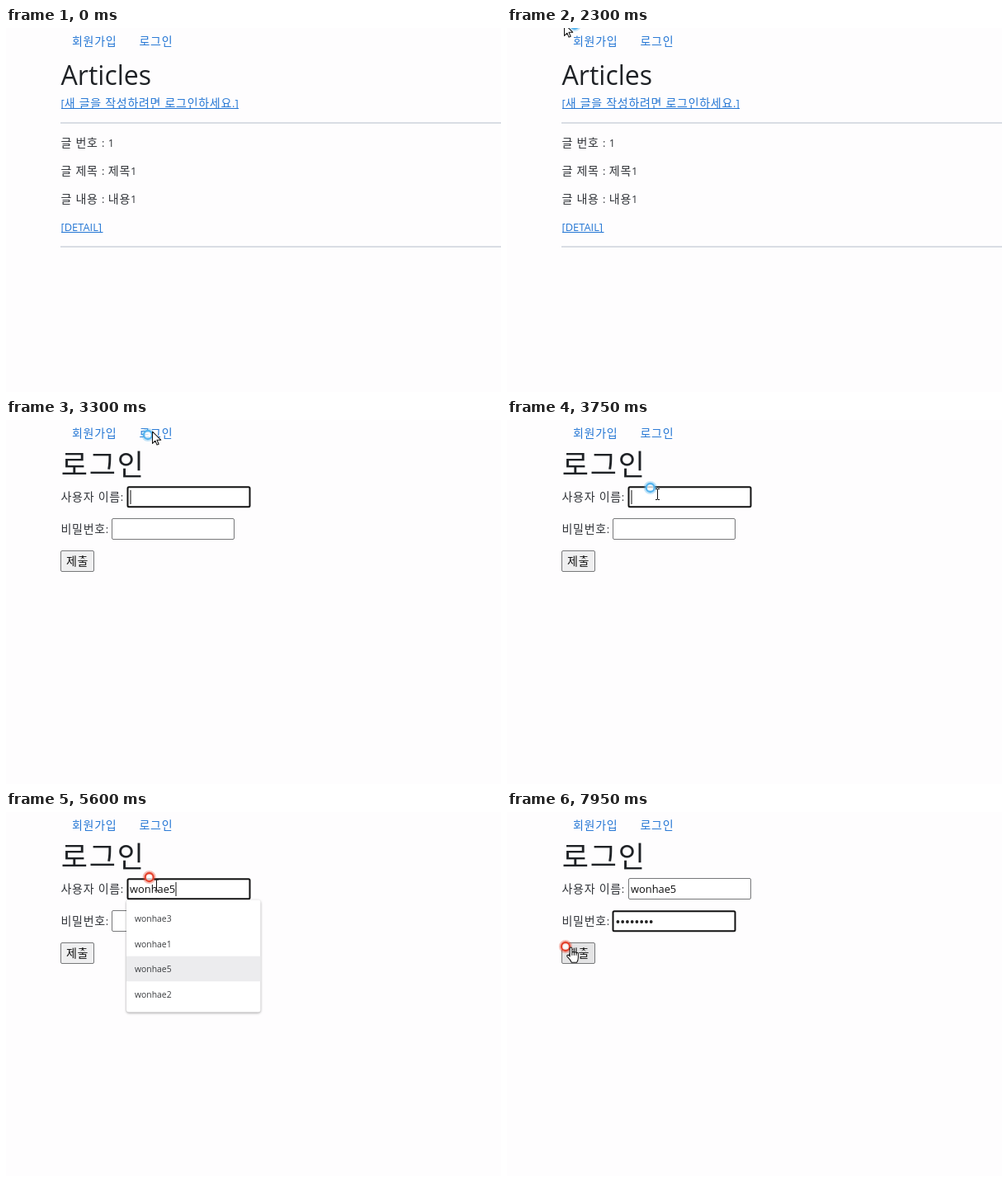
Recreate the animation shown at these times as an HTML page. Size 600 px wide and 441 px high, loop 8 s.

```html
<!DOCTYPE html>
<html lang="ko">
<head>
<meta charset="utf-8">
<title>Articles</title>
<style>
  html, body { margin: 0; width: 100%; height: 100%; overflow: hidden; background: #fefdfe; }
  svg { display: block; width: 600px; height: 441px; }
  text { font-size: 13.6px; fill: #303338; white-space: pre; }
  .h { font-family: "Noto Sans CJK KR", "Noto Sans CJK", sans-serif; font-size: 1.03em; letter-spacing: .05em; }
  .l { font-family: "Open Sans", "Noto Sans", sans-serif; font-size: .945em; word-spacing: .08em; }
  .title { font-size: 34px; fill: #1f2226; }
  .title .h { font-weight: 350; }
  .link { fill: #2476d4; }
  .input { fill: #111; }
  .option { font-size: 11px; fill: #3c3e41; }
  .shadow { filter: drop-shadow(0 1px 1.5px rgba(0, 0, 0, .38)); }
</style>
</head>
<body>
<svg id="stage" viewBox="0 0 600 441"></svg>
<script>
const LOOP = 8000, TICK = 50;
const stage = document.getElementById('stage');

function add(parent, tag, attrs = {}) {
  const el = document.createElementNS('http://www.w3.org/2000/svg', tag);
  for (const k in attrs) el.setAttribute(k, attrs[k]);
  return parent.appendChild(el);
}
const group = (parent = stage) => add(parent, 'g');
const box = (parent, x, y, width, height, attrs) => add(parent, 'rect', { x, y, width, height, ...attrs });
const show = (el, on) => el.setAttribute('display', on ? 'inline' : 'none');

// Border drawn inside the given outline, so its edges stay sharp.
const framed = (parent, x, y, w, h, line, attrs) =>
  box(parent, x + line / 2, y + line / 2, w - line, h - line, { rx: 1.5, 'stroke-width': line, ...attrs });

// Hangul and Latin runs get their own font.
function setText(el, str) {
  if (el.textContent === str) return;
  el.textContent = '';
  for (const run of str.match(/[가-힣]+|[^가-힣]+/g) || [])
    add(el, 'tspan', { class: /[가-힣]/.test(run) ? 'h' : 'l' }).textContent = run;
}
function label(parent, x, y, str, cls = '') {
  const el = add(parent, 'text', { x, y, class: cls });
  setText(el, str);
  return el;
}

label(stage, 80, 21, '회원가입', 'link');
label(stage, 161.5, 21, '로그인', 'link');

// Article list
const list = group();
label(list, 66.5, 68.5, 'Articles', 'title');
label(list, 66.5, 95.7, '[새 글을 작성하려면 로그인하세요.]', 'link');
label(list, 66.5, 143.8, '글 번호 : 1');
label(list, 66.5, 177.8, '글 제목 : 제목1');
label(list, 66.5, 211.8, '글 내용 : 내용1');
label(list, 66.5, 245.7, '[DETAIL]', 'link');
box(list, 67, 97, 215, 1, { fill: '#2476d4' });
box(list, 67, 247, 50.5, 1, { fill: '#2476d4' });
for (const y of [114, 264]) box(list, 66, y, 534, 2, { fill: '#d9dde4' });

// Login form
const form = group();
label(form, 66.8, 67.4, '로그인', 'title');
label(form, 66.5, 98, '사용자 이름:');
label(form, 66.5, 137, '비밀번호:');
const fields = [[147, 80], [128, 119]].map(([x, y]) => ({
  plain: framed(form, x, y, 149, 26, 1, { fill: '#fff', stroke: '#77787a' }),
  focus: framed(form, x - .5, y + .2, 150, 26, 2, { fill: '#fff', stroke: '#111' })
}));
const nameText = label(form, 150, 98, '', 'input');
const dots = Array.from({ length: 8 }, (_, i) =>
  add(form, 'circle', { cx: 134.4 + 5.75 * i, cy: 133, r: 1.9, fill: '#222' }));
const caret = box(form, 0, 0, 1, 17, { fill: '#111' });
const button = framed(form, 66, 158, 41, 26, 1, { stroke: '#77787a' });
label(form, 73, 176.3, '제출', 'input');

// Suggestions
const options = ['wonhae3', 'wonhae1', 'wonhae5', 'wonhae2'];
const menu = group(form);
box(menu, 146, 106.5, 162.5, 136, { rx: 3, fill: '#fff', class: 'shadow' });
const picked = box(menu, 146, 0, 162.5, 30.5, { fill: '#ececee' });
options.forEach((s, i) => label(menu, 156, 133.2 + 30.5 * i, s, 'option'));

// Input state ring and pointers
const ring = group();
const halo = add(ring, 'circle', { r: 5.3, fill: 'none', 'stroke-width': 5.5, opacity: .35 });
const core = add(ring, 'circle', { r: 5, fill: '#fff', 'fill-opacity': .75, 'stroke-width': 2.3 });
const pointer = group();
const ink = { fill: '#fff', stroke: '#111', 'stroke-width': 1.2, 'stroke-linejoin': 'round' };
const shapes = { arrow: group(pointer), hand: group(pointer), beam: group(pointer) };
add(shapes.arrow, 'path', { ...ink, transform: 'scale(.85)',
  d: 'M0 0V17L4 13.2L6.5 19L9 18L6.5 12H12Z' });
add(shapes.hand, 'path', { ...ink, transform: 'scale(.85) translate(-6.6 0)',
  d: 'M5 13V2.2a1.6 1.6 0 0 1 3.2 0V8.5a1.5 1.5 0 0 1 3 0a1.5 1.5 0 0 1 3 .7a1.4 1.4 0 0 1 2.8 .7V15q0 4-2 7H7.5Q6 18.5 1.2 13.8q-.8-2 1-2.2q1.4 0 2.8 2ZM8.2 8.5v3.5M11.2 8.5v3.5M14.2 9.2v3' });
add(shapes.beam, 'path', { d: 'M-2.5-6.5H-.5L0-6L.5-6.5H2.5M0-6V6M-2.5 6.5H-.5L0 6L.5 6.5H2.5',
  fill: 'none', stroke: '#111' });

// Timetables: [time, values...]
const pointerPath = [[1600, 72, -20], [1650, 72, -16], [2300, 69.5, -5], [2450, 73, -1], [2550, 96, 5],
  [2800, 177.5, 14], [3300, 177.5, 14], [3700, 182.5, 90.5], [3850, 182.5, 88.5], [7650, 182.5, 88.5], [7900, 77.5, 163.5]];
const ringPath = [[1600, 85, -16], [1650, 85, -12], [2300, 82, -4], [2450, 83, 1], [2550, 94, 9],
  [2800, 172, 15], [3300, 172, 18], [3750, 173.7, 82], [3850, 173.7, 79], [7650, 173.7, 79], [7900, 71, 163]];
const pulse = [[2850, 1], [3000, 1.6], [3150, 1.3], [3300, 1]];
const pointerShape = [[0, 'arrow'], [2550, 'hand'], [2650, 'arrow'], [2750, 'hand'], [3300, 'arrow'],
  [3600, 'beam'], [7700, 'arrow'], [7850, 'hand']];
const names = [[0, ''], [4150, 'w'], [5200, options[0]], [5350, options[1]], [5500, options[2]]];
const choice = [[0, -1], [5200, 0], [5350, 1], [5500, 2]];
const dotTimes = [6350, 6500, 6600, 6800, 6900, 7050, 7200, 7350];
const LOGIN = 3300, RED = 4000, OPEN = 4150, CLOSE = 5700, TAB = 6050, HOVER = 7850;
const keyTimes = [LOGIN, OPEN, 5200, 5350, 5500, CLOSE, TAB, ...dotTimes];

const step = (table, t) => table.filter(row => row[0] <= t).pop()[1];
function path(table, t) {
  const i = table.findIndex(row => row[0] > t);
  if (i < 1) return (i ? table[table.length - 1] : table[0]).slice(1);
  const [a, b] = [table[i - 1], table[i]];
  const p = (t - a[0]) / (b[0] - a[0]), e = p * p * (3 - 2 * p);
  return a.slice(1).map((v, k) => v + (b[k + 1] - v) * e);
}

function drawForm(t) {
  const onPassword = t >= TAB;
  fields.forEach((f, i) => {
    const active = onPassword === (i === 1);
    show(f.plain, !active);
    show(f.focus, active);
  });
  const name = step(names, t);
  setText(nameText, name);
  const count = dotTimes.filter(d => d <= t).length;
  dots.forEach((d, i) => show(d, i < count));

  const nameEnd = name.length > 1 ? 205.5 : name ? 159.5 : 150.5;
  caret.setAttribute('x', onPassword ? 131.2 + 5.75 * count : nameEnd);
  caret.setAttribute('y', onPassword ? 124 : 85);
  const last = Math.max(...keyTimes.filter(k => k <= t));
  show(caret, Math.floor((t - last) / 500) % 2 === 0);

  show(menu, t >= OPEN && t < CLOSE);
  const row = step(choice, t);
  show(picked, row >= 0);
  picked.setAttribute('y', 113.7 + 30.5 * row);
  button.setAttribute('fill', t >= HOVER ? '#e4e4e5' : '#efeff0');
}

function draw(t) {
  const login = t >= LOGIN;
  show(list, !login);
  show(form, login);
  if (login) drawForm(t);

  const color = t < RED ? '#56b4ee' : '#e5442f';
  halo.setAttribute('stroke', color);
  core.setAttribute('stroke', color);
  ring.setAttribute('transform', `translate(${path(ringPath, t)}) scale(${path(pulse, t)})`);
  pointer.setAttribute('transform', `translate(${path(pointerPath, t)})`);
  const shape = step(pointerShape, t);
  for (const k in shapes) show(shapes[k], k === shape);
  show(ring, t >= 1650);
  show(pointer, t >= 1650);
}

const start = performance.now();
function loop() {
  const t = (performance.now() - start) % LOOP;
  draw(Math.floor(t / TICK) * TICK);
  requestAnimationFrame(loop);
}
loop();
</script>
</body>
</html>
```
